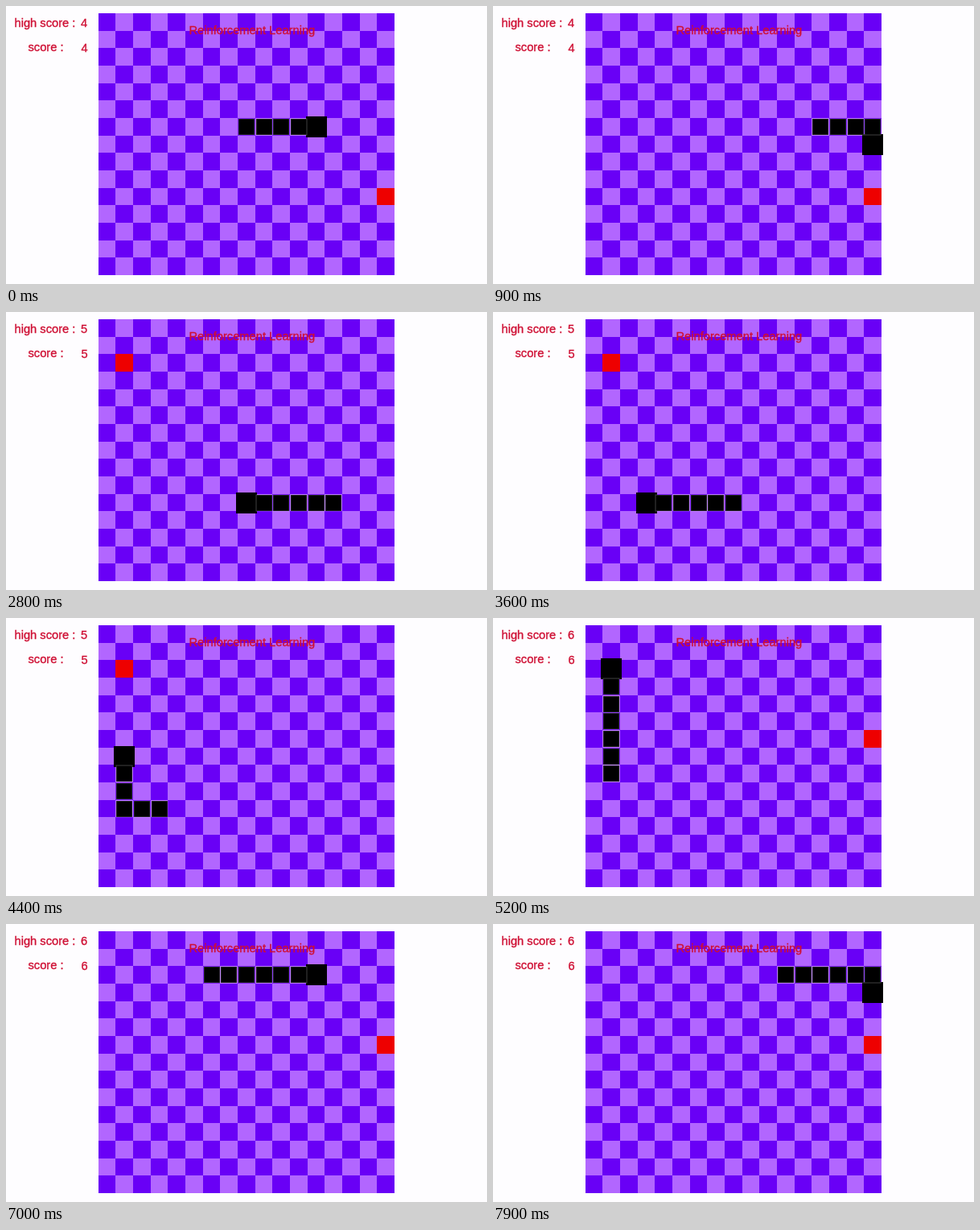
An HTML page that plays this animation: 598x345 px, repeating every 8000 ms.

```html
<!DOCTYPE html>
<html lang="en">
<head>
<meta charset="utf-8">
<title>Snake</title>
<style>
  html, body { margin: 0; width: 100%; height: 100%; overflow: hidden; background: #fefdff; }
  svg { display: block; width: 598px; height: 345px; }
  text {
    font: 14.7px "Liberation Sans", Arial, sans-serif;
    fill: #cf1034; stroke: #cf1034; stroke-width: .35px;
  }
</style>
</head>
<body>
<svg viewBox="0 0 598 345">
  <g id="board" shape-rendering="crispEdges"></g>
  <rect id="food" fill="#ee0000" shape-rendering="crispEdges"/>
  <g id="snake"></g>
  <text x="10.5" y="25.5">high score :</text>
  <text id="best" x="93" y="25.5"></text>
  <text x="27.5" y="55.5">score :</text>
  <text id="score" x="93.5" y="56.5"></text>
  <text x="227.5" y="35">Reinforcement Learning</text>
</svg>
<script>
const LOOP = 8000, FRAME = 100, STEPS_PER_SECOND = 6;
const COLS = 17, ROWS = 15, CELL = 21.67, LEFT = 114.7, TOP = 9;
const START_LENGTH = 5;
const FOODS = [[16, 10], [1, 2], [16, 6]];
const RUNS = [[1, 0, 8], [0, 1, 4], [-1, 0, 15], [0, -1, 8], [1, 0, 15], [0, 1, 4]];

const byId = id => document.getElementById(id);
const edgeX = col => Math.round(LEFT + col * CELL);
const edgeY = row => Math.round(TOP + row * CELL);

function setAttrs(node, attrs) {
  for (const key in attrs) node.setAttribute(key, attrs[key]);
  return node;
}

function addRect(parent, attrs) {
  const node = document.createElementNS("http://www.w3.org/2000/svg", "rect");
  return parent.appendChild(setAttrs(node, attrs));
}

function cellBox(col, row) {
  const x = edgeX(col), y = edgeY(row);
  return { x, y, width: edgeX(col + 1) - x, height: edgeY(row + 1) - y };
}

for (let row = 0; row < ROWS; row++) {
  for (let col = 0; col < COLS; col++) {
    const fill = (row + col) % 2 ? "#b266ff" : "#6900f6";
    addRect(byId("board"), { ...cellBox(col, row), fill });
  }
}

// Every cell the head visits, beginning at the tail of the first pose.
const path = [[8, 6]];
for (const [dx, dy, count] of RUNS) {
  for (let i = 0; i < count; i++) {
    const [col, row] = path[path.length - 1];
    path.push([col + dx, row + dy]);
  }
}

const mealSteps = FOODS.slice(0, 2).map(([col, row]) =>
  path.findIndex(p => p[0] === col && p[1] === row) - START_LENGTH + 1);

const segments = Array.from({ length: START_LENGTH + mealSteps.length },
  () => addRect(byId("snake"), { fill: "#000" }));

function render(time) {
  const shown = Math.floor((time % LOOP) / FRAME) * FRAME;
  const step = Math.floor(shown * STEPS_PER_SECOND / 1000 + 0.1);
  const eaten = mealSteps.filter(meal => step >= meal).length;
  const headIndex = step + START_LENGTH - 1;

  segments.forEach((segment, i) => {
    const visible = i < START_LENGTH + eaten;
    segment.setAttribute("visibility", visible ? "visible" : "hidden");
    if (!visible) return;
    const [col, row] = path[headIndex - i];
    const x = edgeX(col), y = edgeY(row);
    setAttrs(segment, i === 0
      ? { x: x - 2, y: y - 2, width: 26, height: 26 }
      : { x: x + 1, y: y + 1, width: 20, height: 20, stroke: "#fff", "stroke-opacity": .25, "stroke-width": 1 });
  });

  setAttrs(byId("food"), cellBox(...FOODS[eaten]));
  byId("score").textContent = byId("best").textContent = 4 + eaten;
}

const began = performance.now();
function tick() {
  render(performance.now() - began);
  requestAnimationFrame(tick);
}
tick();
</script>
</body>
</html>
```
